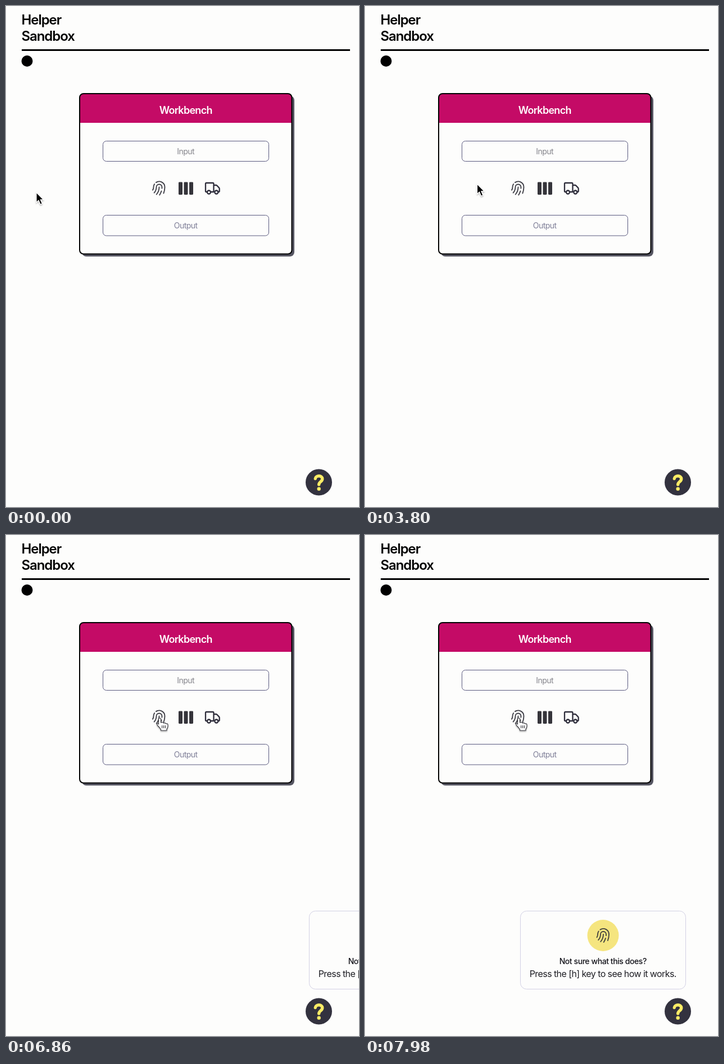
These frames come from a looping animation (628x892 px, 8 s). An HTML page:

```html
<!DOCTYPE html>
<html lang="en">
<head>
<meta charset="utf-8">
<title>Helper Sandbox</title>
<style>
  html, body { margin: 0; width: 100%; height: 100%; overflow: hidden; background: #fdfdfc; }
  svg { display: block; width: 628px; height: 892px; }
  text { font-family: Inter, "Open Sans", sans-serif; letter-spacing: -.036em; }
  .title { font-size: 24px; font-weight: 600; letter-spacing: -.045em; }
  .mid { text-anchor: middle; }
  .line { fill: none; stroke-linecap: round; stroke-linejoin: round; }
</style>
</head>
<body>
<svg viewBox="0 0 628 892">
  <defs>
    <filter id="soft" x="-50%" y="-50%" width="200%" height="200%">
      <feDropShadow dx="0" dy="1.5" stdDeviation="1.3" flood-opacity=".35"/>
    </filter>
    <path id="print" class="line" stroke-width="1.4" d="M7.86 4.24A7.5 7.5 0 0 1 19.5 10.5c0 2.92-.56 5.71-1.57 8.27M5.74 6.36A7.47 7.47 0 0 0 4.5 10.5a7.46 7.46 0 0 1-1.15 4M5.34 18.05A11.2 11.2 0 0 0 8.25 10.5a3.75 3.75 0 1 1 7.5 0c0 .53-.02 1.05-.06 1.57M12 10.5a14.94 14.94 0 0 1-3.6 9.75M15.03 15.65a18.67 18.67 0 0 1-2.48 5.33"/>
  </defs>

  <rect width="628" height="892" fill="#fdfdfc"/>
  <text class="title" x="27.5" y="32.5">Helper</text>
  <text class="title" x="27.5" y="62">Sandbox</text>
  <rect x="28" y="77" width="584" height="3"/>
  <circle cx="37.5" cy="98" r="10"/>

  <rect x="135" y="160" width="378" height="286" rx="8" fill="#555561"/>
  <rect x="131" y="156" width="377.5" height="285.5" rx="7" fill="#fdfdfc"/>
  <path d="M131 208V163Q131 156 138 156H501.5Q508.5 156 508.5 163V208Z" fill="#c40b66"/>
  <rect x="131" y="156" width="377.5" height="285.5" rx="7" fill="none" stroke="#000" stroke-width="2"/>
  <text class="mid" x="319.7" y="192" font-size="18" font-weight="600" fill="#fff" style="letter-spacing:-.04em">Workbench</text>

  <g fill="none" stroke="#59587e">
    <rect x="172.5" y="240.5" width="295" height="36" rx="6"/>
    <rect x="172.5" y="372.5" width="295" height="36.5" rx="6"/>
  </g>
  <text class="mid" x="319.7" y="263.5" font-size="14" fill="#85858c">Input</text>
  <text class="mid" x="319.7" y="395.5" font-size="14" fill="#7f7f98">Output</text>

  <use href="#print" transform="translate(256.5 308.5) scale(1.333)" stroke="#3c3c44"/>
  <g fill="#35343a">
    <rect x="307" y="313.5" width="7" height="22.5" rx="1.4"/>
    <rect x="316.5" y="313.5" width="7" height="22.5" rx="1.4"/>
    <rect x="326" y="313.5" width="7" height="22.5" rx="1.4"/>
  </g>
  <g class="line" stroke="#2f2e3c" stroke-width="2.3">
    <path d="M357.5 331H356.3Q355 331 355 329.5V316.5Q355 315 356.5 315H368Q369.5 315 369.5 316.5V331H364.5M369.5 319H373.5Q374.6 319 375.4 319.8L379 323.6Q379.7 324.4 379.7 325.4V329.6Q379.7 331 378.3 331H377.8"/>
    <circle cx="361" cy="331.5" r="3"/>
    <circle cx="374.3" cy="331.5" r="3"/>
  </g>

  <circle cx="556.5" cy="848" r="23.5" fill="#33323f"/>
  <path class="line" d="M550.3 841.5C551 835.2 562.8 835 562.8 842C562.8 847 556.7 847 556.7 852" stroke="#fbec66" stroke-width="5.4"/>
  <circle cx="556.7" cy="859.7" r="3.2" fill="#fbec66"/>

  <g id="toast">
    <rect x=".5" y="669.5" width="294" height="139" rx="11" fill="#fdfdfc" stroke="#d2d0e4"/>
    <circle cx="147.5" cy="713" r="28" fill="#f5e57f"/>
    <use href="#print" transform="translate(132 697) scale(1.333)" stroke="#45443f"/>
    <text class="mid" x="147.3" y="763.5" font-size="14" font-weight="500" fill="#111118" style="letter-spacing:-.03em">Not sure what this does?</text>
    <text class="mid" x="147.3" y="786.5" font-size="16" fill="#1e1e24">Press the [h] key to see how it works.</text>
  </g>

  <g id="pointer" filter="url(#soft)">
    <path id="arrow" d="M0 0V17.6L4 14L7.2 21.3L10.4 19.9L7.3 12.8H12.6Z" stroke="#fff" stroke-width="1.2"/>
    <g id="hand" stroke="#3c3c42" stroke-width="1.2" stroke-linejoin="round">
      <path fill="#fff" d="M-2 2Q-2 0 0 0Q2 0 2 2V8Q6 6.5 6.8 9Q10 7.8 10.8 10Q14.5 9.3 14.5 12V15Q14 18 12.5 19.5V22H2V20Q0 17-4 13Q-6 10.5-4 9.8Q-2.5 9.6-2 11Z"/>
      <path fill="none" d="M4.2 13V18M7.1 13V18M10 13V18"/>
    </g>
  </g>
</svg>
<script>
const LOOP = 8000, HAND_FROM = 4500;
const pointerX = [[2100, 54], [2860, 118], [3060, 144], [3720, 193], [4500, 255], [4640, 259.5], [4760, 259.5], [5200, 273.5]];
const pointerY = [[2100, 332], [2860, 322], [3060, 318.5], [3720, 317], [4760, 317], [5200, 326]];
const toastX = [[6600, 640], [6860, 540], [7120, 323], [7290, 222], [7440, 248.5], [7700, 269], [7980, 276.5]];

// Monotone cubic through [time, value] points, flat at the ends and turning points.
function track(points, t) {
  const last = points.length - 1;
  if (t <= points[0][0]) return points[0][1];
  if (t >= points[last][0]) return points[last][1];
  const rate = k => (points[k + 1][1] - points[k][1]) / (points[k + 1][0] - points[k][0]);
  const slope = k => {
    if (k === 0 || k === last) return 0;
    const a = rate(k - 1), b = rate(k);
    return a * b > 0 ? 2 * a * b / (a + b) : 0;
  };
  const i = points.findIndex(p => p[0] > t) - 1;
  const [t0, v0] = points[i], [t1, v1] = points[i + 1];
  const span = t1 - t0, u = (t - t0) / span, w = 1 - u;
  return v0 * (1 + 2 * u) * w * w + v1 * u * u * (3 - 2 * u)
    + span * u * w * (slope(i) * w - slope(i + 1) * u);
}

const el = id => document.getElementById(id);
const toast = el('toast'), pointer = el('pointer'), arrow = el('arrow'), hand = el('hand');
const show = (node, on) => node.setAttribute('visibility', on ? 'visible' : 'hidden');

function draw(t) {
  toast.setAttribute('transform', `translate(${track(toastX, t) - .5} 0)`);
  pointer.setAttribute('transform', `translate(${track(pointerX, t)} ${track(pointerY, t)})`);
  show(arrow, t < HAND_FROM);
  show(hand, t >= HAND_FROM);
}

const start = performance.now();
function tick() {
  draw((performance.now() - start) % LOOP);
  requestAnimationFrame(tick);
}
draw(0);
requestAnimationFrame(tick);
</script>
</body>
</html>
```
